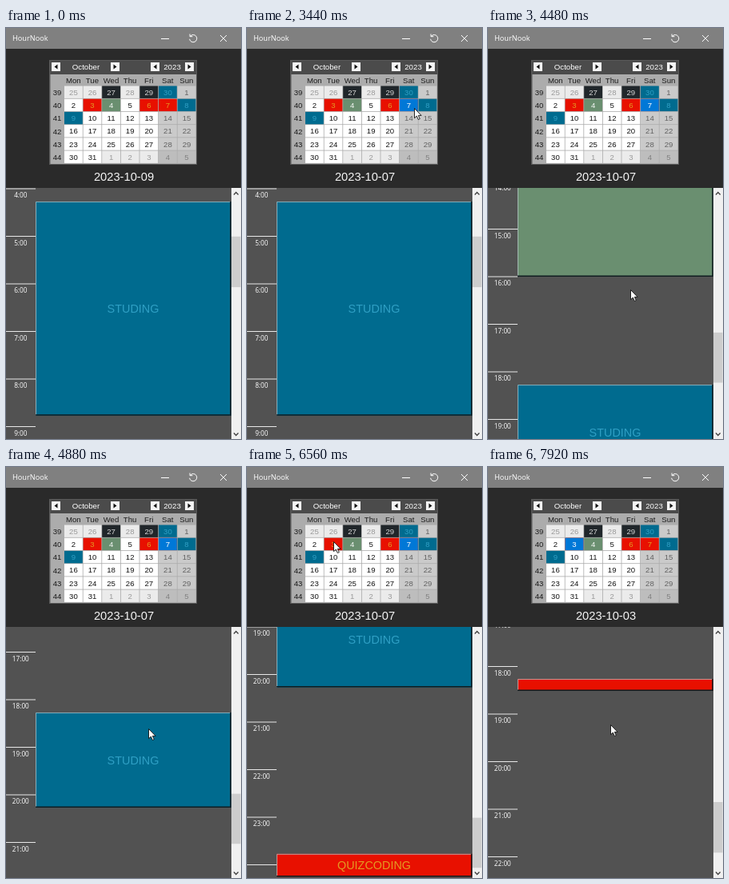
An HTML page that plays this animation: 294 by 514 pixels, repeating every 8 s.

```html
<!DOCTYPE html>
<html lang="en">
<head>
<meta charset="utf-8">
<title>HourNook</title>
<style>
html, body { margin: 0; width: 100%; height: 100%; overflow: hidden; background: #2a2a2a; }
svg { display: block; width: 294px; height: 514px; }
text { font-family: "Liberation Sans", Arial, sans-serif; }
.ui { font-family: "Open Sans", "Noto Sans", sans-serif; }
</style>
</head>
<body>
<svg id="stage" viewBox="0 0 294 514"></svg>
<script>
const HOUR = 59.5, TOP = 200, VIEW = 314, LOOP = 8000, STEP = 80;
const TEAL = '#006b8f', RED = '#e81000', GREEN = '#6a8f70', DARK = '#20262a';
const INK = { [TEAL]: '#2f9fc4', [RED]: '#e39a22', [GREEN]: '#f4f6f4', [DARK]: '#d8d8d8' };

const rect = (x, y, w, h, fill, more = '') =>
  `<rect x="${x}" y="${y}" width="${w}" height="${h}" fill="${fill}" ${more}/>`;
const path = (d, stroke, more = '') => `<path d="${d}" fill="none" stroke="${stroke}" ${more}/>`;
// y is the middle of the capitals
const text = (x, y, s, size, fill, more = 'text-anchor="middle"') =>
  `<text x="${x}" y="${y + size * .36}" font-size="${size}" fill="${fill}" ${more}>${s}</text>`;

function titleBar() {
  return rect(0, 0, 294, 26, '#808080') +
    text(8, 13, 'HourNook', 9.2, '#fff', 'class="ui"') +
    path('M194 13.5h10M268 9l8 8m0-8l-8 8M230.6 10.2a4.6 4.6 0 1 1-1 3.6M230 7.5v3.2h3.4', '#fff');
}

function arrowButton(x, dir) {
  const c = x + 5.5;
  return rect(x, 43, 11, 11, '#f4f4f4') +
    `<path d="M${c + 2 * dir} 48.5l${-4 * dir} -3v6z" fill="#111"/>`;
}

function calendar() {
  const marks = { 2: DARK, 4: DARK, 5: TEAL, 8: RED, 9: GREEN, 11: RED, 12: RED, 13: TEAL, 14: TEAL };
  const colX = c => 73 + c * 23.6, rowY = r => 72.5 + r * 16.2;
  let out = rect(54, 40, 185, 131, '#5a5a5a') + rect(55.5, 41, 182.5, 17, '#4b4b4b') +
    rect(55.5, 58, 182.5, 112, '#acacac') +
    arrowButton(57, -1) + arrowButton(131, 1) + arrowButton(181, -1) + arrowButton(224, 1) +
    text(100, 49, 'October', 9.7, '#fff') + text(208, 49, '2023', 9.7, '#fff');
  'Mon Tue Wed Thu Fri Sat Sun'.split(' ').forEach((d, c) =>
    out += text(colX(c) + 11.3, 65.5, d, 9.6, '#1c1c1c'));
  for (let r = 0; r < 6; r++) {
    out += text(64, rowY(r) + 8, 39 + r, 9.6, '#1c1c1c');
    for (let c = 0; c < 7; c++) {
      const i = r * 7 + c, offset = i - 5;
      const day = offset < 1 ? offset + 30 : offset > 31 ? offset - 31 : offset;
      const other = offset < 1 || offset > 31, weekend = c > 4;
      const fill = marks[i] || (weekend ? (other ? '#bdbdbd' : '#cacaca') : other ? '#ebebeb' : '#fff');
      const ink = INK[marks[i]] || (other ? (weekend ? '#818181' : '#999') : weekend ? '#626262' : '#151515');
      out += `<g id="cell${offset}">` + rect(colX(c), rowY(r), 22.8, 15.4, fill) +
        text(colX(c) + 11.4, rowY(r) + 7.8, day, 9.6, ink) + '</g>';
    }
  }
  return out;
}

// Each entry: start hour, end hour, colour, label
const days = {
  9: { height: 1428, events: [[4.27, 8.77, TEAL, 'STUDING']] },
  7: { height: 1443, events: [[11.27, 16, GREEN, 'PROGRAMING'], [18.27, 20.27, TEAL, 'STUDING'],
    [23.77, 24.25, RED, 'QUIZCODING']] },
  3: { height: 1428, events: [[12, 13.27, GREEN, 'PROGRAMING'], [14, 16.52, TEAL, 'STUDING'],
    [18.26, 18.51, RED, '']] }
};

function block([from, to, fill, label]) {
  const y = from * HOUR, h = (to - from) * HOUR;
  return rect(37, y, 244.5, h, fill) +
    path(`M37.5 ${y + h}V${y + .5}H281`, '#b9c6c8', 'stroke-opacity=".75"') +
    path(`M37 ${y + h - .7}H281V${y}`, '#101c20', 'stroke-width="1.5"') +
    text(159, y + h / 2, label, 14.4, INK[fill]);
}

function schedule() {
  let out = rect(0, TOP, 294, VIEW, '#525252') +
    '<clipPath id="view"><rect y="200" width="294" height="314"/></clipPath>' +
    '<g clip-path="url(#view)"><g id="sheet">';
  for (let h = 0; h <= 24; h++) {
    out += rect(0, h * HOUR - .5, 37, 1, '#e8e8e8');
    if (h < 24) out += text(18.3, h * HOUR + 8.5, h + ':00', 8.2, '#fff', 'class="ui" text-anchor="middle"');
  }
  for (const d in days) out += `<g id="day${d}">${days[d].events.map(block).join('')}</g>`;
  return out + '</g></g>' + rect(282, TOP, 12, VIEW, '#f0f0f0') +
    rect(282, 0, 11.5, 0, '#cdcdcd', 'id="thumb"') +
    path('M285 208.5l2.8-3 2.8 3M285 506.5l2.8 3 2.8-3', '#444', 'stroke-width="1.4"');
}

const $ = id => document.getElementById(id);
$('stage').innerHTML = rect(0, 0, 294, 514, '#2a2a2a') + titleBar() + calendar() +
  text(147.5, 186, '', 14.7, '#f4f4f4', 'id="date" text-anchor="middle"') + schedule() +
  '<path id="cursor" d="M.5 .5v12.2l2.8-2.6 2 4.4 2-.9-2-4.2h3.8z" fill="#fff" stroke="#111" stroke-width=".9"/>';

// Highlight for the picked day
for (const d of [3, 7]) {
  const cell = $('cell' + d), base = cell.firstChild;
  const x = +base.getAttribute('x'), y = +base.getAttribute('y');
  cell.insertAdjacentHTML('beforeend', `<g id="pick${d}">` + rect(x, y, 22.8, 15.4, '#0078d7') +
    text(x + 11.4, y + 7.8, d, 9.6, '#fff') + '</g>');
}

const scrollKeys = [[0, 237], [3519, 237], [3520, 653.5], [4080, 653.5], [4480, 841], [4720, 945],
  [4800, 945], [5120, 1085], [5200, 1085], [5280, 1130.5], [6959, 1130.5], [6960, 713],
  [7360, 713], [7680, 918], [7760, 918], [7920, 1021.5]];
const cursorKeys = [[1920, 213, 207], [2080, 213, 207], [2560, 183, 150], [2960, 206, 100],
  [3040, 206, 100], [3120, 209, 100], [3440, 209, 100], [4080, 178, 327], [5280, 178, 327],
  [6080, 157, 124], [6560, 108, 93], [6800, 108, 93], [7280, 163, 317], [7360, 163, 317], [7680, 153, 322]];

function sample(keys, t) {
  const i = keys.findIndex(k => k[0] > t);
  if (i < 1) return (i ? keys[keys.length - 1] : keys[0]).slice(1);
  const a = keys[i - 1], b = keys[i], p = (t - a[0]) / (b[0] - a[0]);
  return a.slice(1).map((v, n) => v + (b[n + 1] - v) * p);
}

const dayAt = t => t < 3280 ? 9 : t < 6720 ? 7 : 3;
const show = (id, on) => $(id).setAttribute('visibility', on ? 'visible' : 'hidden');

function draw(now) {
  const t = Math.floor(now % LOOP / STEP) * STEP;
  const picked = dayAt(t), shown = dayAt(t - 240);
  const [scroll] = sample(scrollKeys, t), [x, y] = sample(cursorKeys, t);
  $('date').textContent = '2023-10-0' + picked;
  show('pick3', picked === 3);
  show('pick7', picked === 7);
  for (const d in days) show('day' + d, +d === shown);
  $('sheet').setAttribute('transform', `translate(0 ${TOP - scroll})`);
  const scale = 288 / days[shown].height;
  $('thumb').setAttribute('y', 213 + scroll * scale);
  $('thumb').setAttribute('height', VIEW * scale);
  $('cursor').setAttribute('transform', `translate(${Math.round(x)} ${Math.round(y)})`);
  show('cursor', t >= 1920);
}

const start = performance.now();
function tick() {
  draw(performance.now() - start);
  requestAnimationFrame(tick);
}
tick();
</script>
</body>
</html>
```
